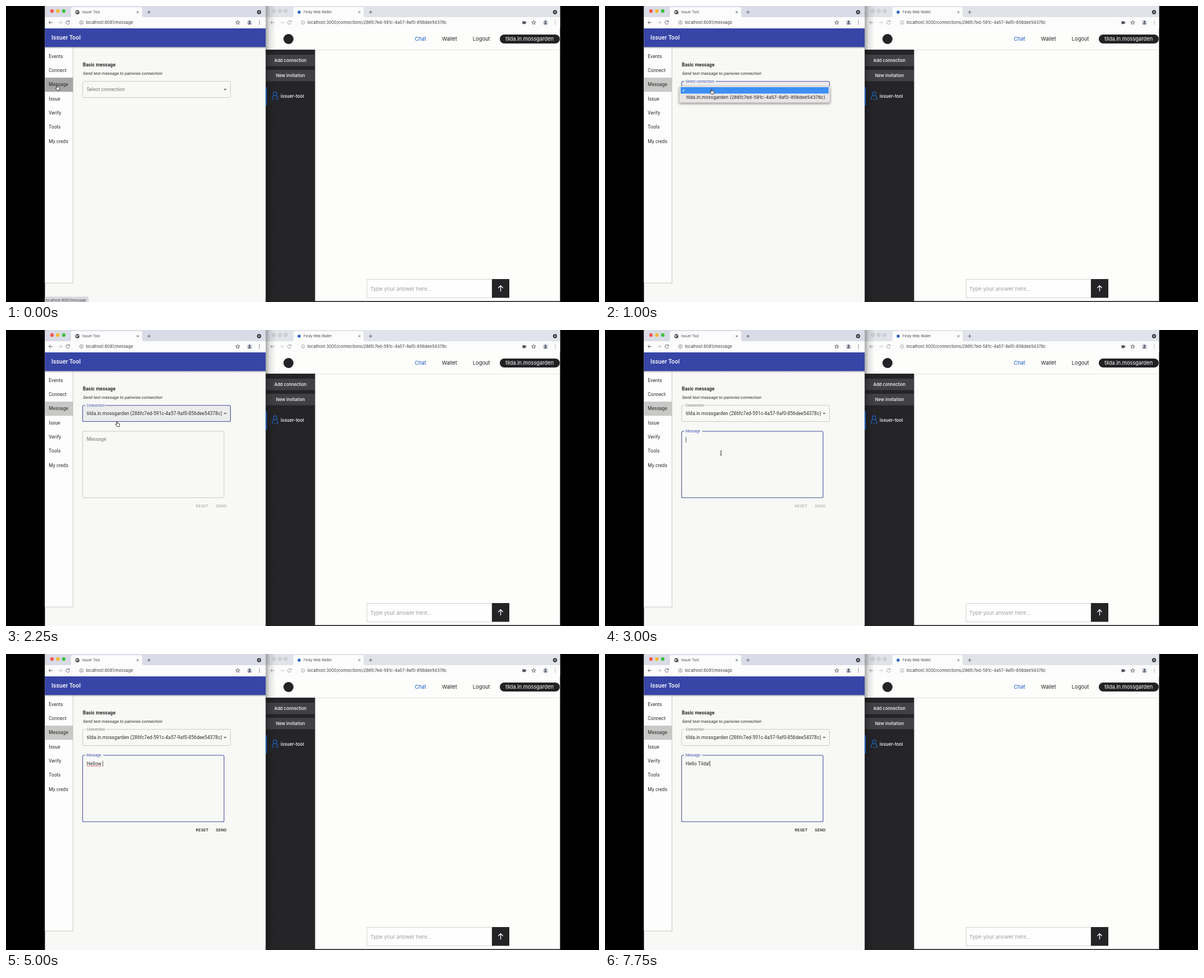
Animation of 1058 by 529 pixels, one loop 8000 ms. Source, as an HTML page:

```html
<!DOCTYPE html>
<html lang="en">
<head>
<meta charset="utf-8">
<title>Messaging demo</title>
<style>
html, body { margin: 0; width: 100%; height: 100%; overflow: hidden; background: #000; }
svg { display: block; width: 100vw; height: 100vh; }
text { white-space: pre; font-family: Roboto, sans-serif; font-size: 8.43px; letter-spacing: .079px; fill: #2b2b2b; }
.ui, .ui text { font-family: Inter, sans-serif; letter-spacing: 0; }
.tab { font-size: 6.1px; fill: #444; }
.url { font-size: 7.35px; fill: #3c4043; }
.nav text { font-size: 9.3px; fill: #222; }
.side text { font-size: 7.6px; font-weight: 500; fill: #fff; }
.small { font-size: 6.32px; }
.btn { font-size: 7.38px; font-weight: 500; letter-spacing: .21px; }
.mid { text-anchor: middle; }
.line { fill: none; stroke: #5f6368; stroke-width: 1; }
</style>
</head>
<body>
<svg viewBox="0 0 1058 529" preserveAspectRatio="none">
<defs>
  <g id="tools" class="line">
    <path d="M6.500 0H0M3-3L0 0L3 3"/>
    <path d="M17 0H23.500M20.500-3L23.500 0L20.500 3" stroke="#b9bbbe"/>
    <path d="M36.300-2A3.200 3.200 0 1 0 36.700 1M36.800-3.500V-1.300H34.500"/>
    <circle cx="58" r="3.100" stroke-width=".8"/>
    <path d="M58-.5V1.700M58-1.900V-1.100" stroke-width=".8"/>
  </g>
  <path id="star" class="line" stroke-width=".8" d="M0-3.600L1-1.100L3.700-1L1.600.7L2.300 3.300L0 1.800L-2.300 3.300L-1.600.7L-3.700-1L-1-1.100Z"/>
  <g id="user">
    <circle r="5" fill="#d9dce5"/>
    <circle cy="-1.300" r="1.700" fill="#444b5a"/>
    <path d="M-3.200 3Q-3 .9 0 .9T3.200 3Z" fill="#444b5a"/>
  </g>
  <g id="dots" fill="#50545a"><circle cy="-2.700" r=".8"/><circle r=".8"/><circle cy="2.700" r=".8"/></g>
  <path id="plus" class="line" d="M-3 0H3M0-3V3"/>
  <path id="close" class="line" d="M-1.700-1.700L1.700 1.700M1.700-1.700L-1.700 1.700"/>
  <g id="more"><circle r="3.700" fill="#3b3e43"/><path d="M-1.700-.7H1.700L0 1.400Z" fill="#fff"/></g>
  <linearGradient id="sideShade"><stop stop-opacity=".32"/><stop offset=".4" stop-opacity=".1"/><stop offset="1" stop-opacity="0"/></linearGradient>
  <linearGradient id="downShade" x2="0" y2="1"><stop stop-opacity=".32"/><stop offset="1" stop-opacity="0"/></linearGradient>
  <filter id="blur" x="-10%" y="-50%" width="120%" height="200%"><feGaussianBlur stdDeviation="2.200"/></filter>
</defs>

<!-- left window -->
<rect x="69.500" width="394" height="529" fill="#f8f8f6"/>
<rect x="69.500" width="394" height="21" fill="#d9dce6"/>
<path d="M113 20Q116 20 116 17V5Q116 2 119 2H240Q243 2 243 5V17Q243 20 246 20Z" fill="#fcfcfc"/>
<rect x="69.500" y="20" width="394" height="20" fill="#fcfcfc"/>
<circle cx="82" cy="9" r="3.200" fill="#f25a52"/>
<circle cx="92.500" cy="9" r="3.200" fill="#f5b932"/>
<circle cx="103" cy="9" r="3.200" fill="#40c043"/>
<circle cx="127.500" cy="11" r="3.800" fill="#44474c"/>
<path d="M124.500 10L127 9L128 11L126.500 13ZM129 8L131 10L130 12Z" fill="#eee"/>
<text class="ui tab" x="136" y="13.300">Issuer Tool</text>
<use href="#close" x="235" y="11"/><use href="#plus" x="255" y="11"/><use href="#more" x="451.500" y="11"/>
<use href="#tools" x="76.500" y="29.500"/>
<text class="ui url" x="142.500" y="32.200">localhost:8081/message</text>
<use href="#star" x="413.500" y="29.500"/><use href="#user" x="434.500" y="29.500"/><use href="#dots" x="452" y="29.500"/>
<path d="M69.500 73H119.500V495H69.500" fill="#fdfdfd"/>
<path d="M119.500 73V495H69.500" fill="none" stroke="#c9c9c4"/>
<rect x="69.500" y="73" width="394" height="3.500" fill="url(#downShade)"/>
<rect x="69.500" y="40" width="394" height="33.300" fill="#3745a7"/>
<text x="81" y="60.200" style="font-size:10.54px;font-weight:500;fill:#fff">Issuer Tool</text>
<rect id="current" x="69.500" y="128" width="50" height="25.300"/>
<g id="menu"></g>
<text x="137" y="107.700" font-weight="700">Basic message</text>
<text transform="translate(137 123.200) skewX(-12)" style="font-size:7.38px">Send text message to pairwise connection</text>

<rect id="select" x="136.700" y="134.700" width="263.800" height="28.800" rx="2"/>
<rect id="selectGap" x="141.500" y="133" height="3" fill="#f8f8f6"/>
<text id="selectLabel" class="small" x="143.700" y="136.500"></text>
<text id="selectText" x="144" y="152"></text>
<path d="M388.300 148H393.700L391 150.800Z" fill="#666"/>

<g id="form">
  <rect id="area" x="136.700" y="181" width="252.300" height="118.800" rx="2" fill="none"/>
  <text id="hint" x="144" y="198.300" style="fill:#757575">Message</text>
  <g id="areaLabel">
    <rect x="141.500" y="179" width="32" height="4" fill="#f8f8f6"/>
    <text class="small" x="143.700" y="183" style="fill:#3f4fae">Message</text>
  </g>
  <text id="typed" x="144" y="198.700"></text>
  <path id="typo" d="M144 200.500H170" stroke="#e5484d" stroke-width="1.100" stroke-dasharray="1.200 .6"/>
  <path id="caret" stroke="#333" stroke-width=".8"/>
  <text class="btn" x="338.500" y="316.700">RESET</text>
  <text class="btn" x="374.300" y="316.700">SEND</text>
</g>

<g id="popup" class="ui">
  <rect x="132" y="145" width="270" height="30" rx="3.500" opacity=".4" filter="url(#blur)"/>
  <rect x="132.500" y="143" width="269" height="29.800" rx="3" fill="#e9e5e5" stroke="#c4c2c4" stroke-width=".6"/>
  <rect id="option" x="135" width="264" height="11.500" fill="#3b8ff5"/>
  <path id="tick" d="M138.300 151L139.500 152.700L142 148.800" fill="none"/>
  <text id="optionText" x="145" y="165.700" style="font-size:8.15px"></text>
</g>

<g id="status">
  <path d="M69.500 520H145Q147 520 147 522V529H69.500Z" fill="#d9dbdf" stroke="#bbb" stroke-width=".5"/>
  <text class="ui" x="70.500" y="527.500" style="font-size:6.3px;fill:#444">localhost:8081/message</text>
</g>

<!-- right window -->
<g class="ui">
  <rect x="463.500" width="525" height="529" fill="#fdfdfc"/>
  <rect x="463.500" width="525" height="21" fill="#e0e3e9"/>
  <path d="M510 20Q513 20 513 17V5Q513 2 516 2H635Q638 2 638 5V17Q638 20 641 20Z" fill="#fcfcfc"/>
  <rect x="463.500" y="20" width="525" height="20" fill="#fcfcfc"/>
  <g fill="#d0d2d5" stroke="#b8babd" stroke-width=".6"><circle cx="478" cy="9" r="3"/><circle cx="488.500" cy="9" r="3"/><circle cx="499" cy="9" r="3"/></g>
  <circle cx="523" cy="11" r="2.700" fill="#2463bd"/>
  <text class="tab" x="531" y="13.300">Findy Web Wallet</text>
  <use href="#close" x="630.500" y="11"/><use href="#plus" x="650.500" y="11"/><use href="#more" x="979.500" y="11"/>
  <use href="#tools" x="472" y="29.500" opacity=".65"/>
  <text class="url" x="538" y="32.200">localhost:3000/connections/286fc7ed-591c-4a57-9af0-856dee54378c</text>
  <path d="M921.500 27.300H926V28.800L928 27.500V32L926 30.700V32.200H921.500Z" fill="#50545a"/>
  <use href="#star" x="941.500" y="29.500"/><use href="#user" x="962.500" y="29.500"/><use href="#dots" x="980" y="29.500" opacity=".6"/>
  <rect x="464" y="78" width="524.500" height="1" fill="#e5e5dc"/>
  <circle cx="504" cy="59" r="9" fill="#222427"/>
  <rect x="881" y="51" width="107" height="16" rx="8" fill="#222225"/>
  <g class="nav mid">
    <text x="739.500" y="62.300" style="fill:#155bc0">Chat</text>
    <text x="791.300" y="62.300">Wallet</text>
    <text x="848.200" y="62.300">Logout</text>
    <text id="account" x="934.200" y="62.300" style="fill:#fff"></text>
  </g>
  <rect x="463.500" y="78" width="88" height="450" fill="#252528"/>
  <rect x="464" y="87" width="87" height="20.500" fill="#414145"/>
  <rect x="464" y="114" width="87" height="20.500" fill="#414145"/>
  <g class="side">
    <text class="mid" x="507.500" y="99.700">Add connection</text>
    <text class="mid" x="507.500" y="127">New invitation</text>
    <text x="490" y="164.300" style="font-size:8.1px">issuer-tool</text>
  </g>
  <g fill="none" stroke="#2167c5" stroke-width="1.200">
    <ellipse cx="480" cy="157" rx="3" ry="3.700"/>
    <path d="M477.800 160Q474.800 161.500 474.800 166.500H477M482.200 160Q485.200 161.500 485.200 166.500H483M478.500 166.500H481.500"/>
  </g>
  <rect x="644" y="488.500" width="223" height="33" fill="#fefefe" stroke="#d3d3cf"/>
  <text x="650" y="508.500" style="font-size:9.35px;fill:#a09f98">Type your answer here...</text>
  <rect x="867" y="488" width="31" height="33.500" fill="#242427"/>
  <path d="M882.500 510V500M878.300 504L882.500 499.700L886.700 504" fill="none" stroke="#fff" stroke-width="1.300"/>
  <rect x="463.500" y="527.300" width="525" height="1.700" fill="#252528"/>
  <rect x="463.500" width="18" height="529" fill="url(#sideShade)"/>
  <rect x="463.500" y="145" width="1.800" height="33" fill="#1d65c8"/>
</g>

<g id="pointer">
  <path id="hand" d="M-1.700-4Q-.7-4.800-.2-3.700V-1.400L2.700-.8Q4-.4 3.800.9L3 4.500H-1L-3.500 1.200Q-3.700 0-2.600.2L-1.700 1Z" fill="#fff" stroke="#222" stroke-width=".9"/>
  <path id="arrow" d="M-2-4V4L0 2.300L1.400 5.200L2.600 4.600L1.300 1.900H3.800Z" fill="#111" stroke="#fff" stroke-width=".7"/>
  <path id="beam" d="M-1.700-4Q0-4 0-3Q0-4 1.700-4M0-3V3M-1.700 4Q0 4 0 3Q0 4 1.700 4M-.9.9H.9" fill="none" stroke="#333" stroke-width=".9"/>
</g>
</svg>
<script>
const LOOP = 8000, STEP = 250;
const account = "tilda.in.mossgarden";
const connection = account + " (286fc7ed-591c-4a57-9af0-856dee54378c)";
const el = id => document.getElementById(id);
const show = (id, on) => el(id).style.display = on ? "" : "none";
const set = (id, attrs) => { for (const k in attrs) el(id).setAttribute(k, attrs[k]); };
const put = (id, text) => el(id).textContent = text;

// time, x, y
const path = [[0, 92, 146], [250, 104, 147], [500, 165, 151], [750, 190, 153], [1000, 191, 153],
  [1250, 193, 161], [1500, 197, 165], [2250, 199, 168], [2750, 205, 212], [3000, 207, 220], [LOOP, 207, 220]];
// time, message text from then on
const typing = [[0, ""], [3500, "H"], [3750, "He"], [4000, "Hel"], [4250, "Hell"], [4500, "Hello"],
  [4750, "Hellow"], [5000, "Hellow "], [5250, "Hellow"], [5500, "Hello"], [5750, "Hello "],
  [6250, "Hello T"], [6500, "Hello Ti"], [6750, "Hello Til"], [7000, "Hello Tild"],
  [7250, "Hello Tilda"], [7750, "Hello Tilda!"]];

["Events", "Connect", "Message", "Issue", "Verify", "Tools", "My creds"].forEach((name, i) => {
  el("menu").innerHTML += `<text x="76.300" y="${92.8 + i * 25.3}">${name}</text>`;
});
put("account", account);
put("optionText", connection);

function position(t) {
  const i = path.findIndex(p => p[0] > t);
  const [t0, x0, y0] = path[i - 1], [t1, x1, y1] = path[i];
  const k = (t - t0) / (t1 - t0);
  return [x0 + (x1 - x0) * k, y0 + (y1 - y0) * k];
}

function border(id, active) {
  set(id, { stroke: active ? "#454f9f" : "#c3c3c1", "stroke-width": active ? 1.1 : .9 });
}

function draw(t) {
  const open = t >= 750 && t < 1500, chosen = t >= 1500, writing = t >= 2750;
  const focused = (open || chosen) && !writing;
  const text = typing.filter(k => k[0] <= t).pop()[1];

  set("current", { fill: t < 250 ? "#a6a6a6" : "#c8c8c7" });
  show("status", t < 500);

  border("select", focused);
  set("select", { fill: focused ? "#ececec" : "#f8f8f6" });
  show("selectGap", open || chosen);
  set("selectGap", { width: chosen ? 36 : 56 });
  put("selectLabel", chosen ? "Connection" : open ? "Select connection" : "");
  el("selectLabel").style.fill = focused ? "#3f4fae" : "#757575";
  put("selectText", chosen ? connection : open ? "" : "Select connection");
  el("selectText").style.fill = chosen ? "#2b2b2b" : "#757575";

  show("popup", open);
  const second = t >= 1250;
  set("option", { y: second ? 157 : 145 });
  set("tick", { stroke: second ? "#333" : "#fff" });
  el("optionText").style.fill = second ? "#fff" : "#222";

  show("form", chosen);
  border("area", writing);
  show("hint", !writing);
  show("areaLabel", writing);
  put("typed", text);
  show("typo", t >= 5000 && t < 5500);
  show("caret", writing && (text || t % 1000 < 500));
  const x = 144.4 + (text ? el("typed").getComputedTextLength() : 0);
  set("caret", { d: `M${x} 191V201` });
  document.querySelectorAll(".btn").forEach(b => b.style.fill = text ? "#2b2b2b" : "#b4b4b4");

  show("pointer", t < 3500);
  const shape = writing ? "beam" : t === 250 || t === 2500 ? "arrow" : "hand";
  for (const id of ["hand", "arrow", "beam"]) show(id, id === shape);
  set("pointer", { transform: `translate(${position(t)})` });
}

const start = performance.now();
function tick() {
  const t = (performance.now() - start) % LOOP;
  draw(Math.floor(t / STEP) * STEP);
  requestAnimationFrame(tick);
}
tick();
</script>
</body>
</html>
```
